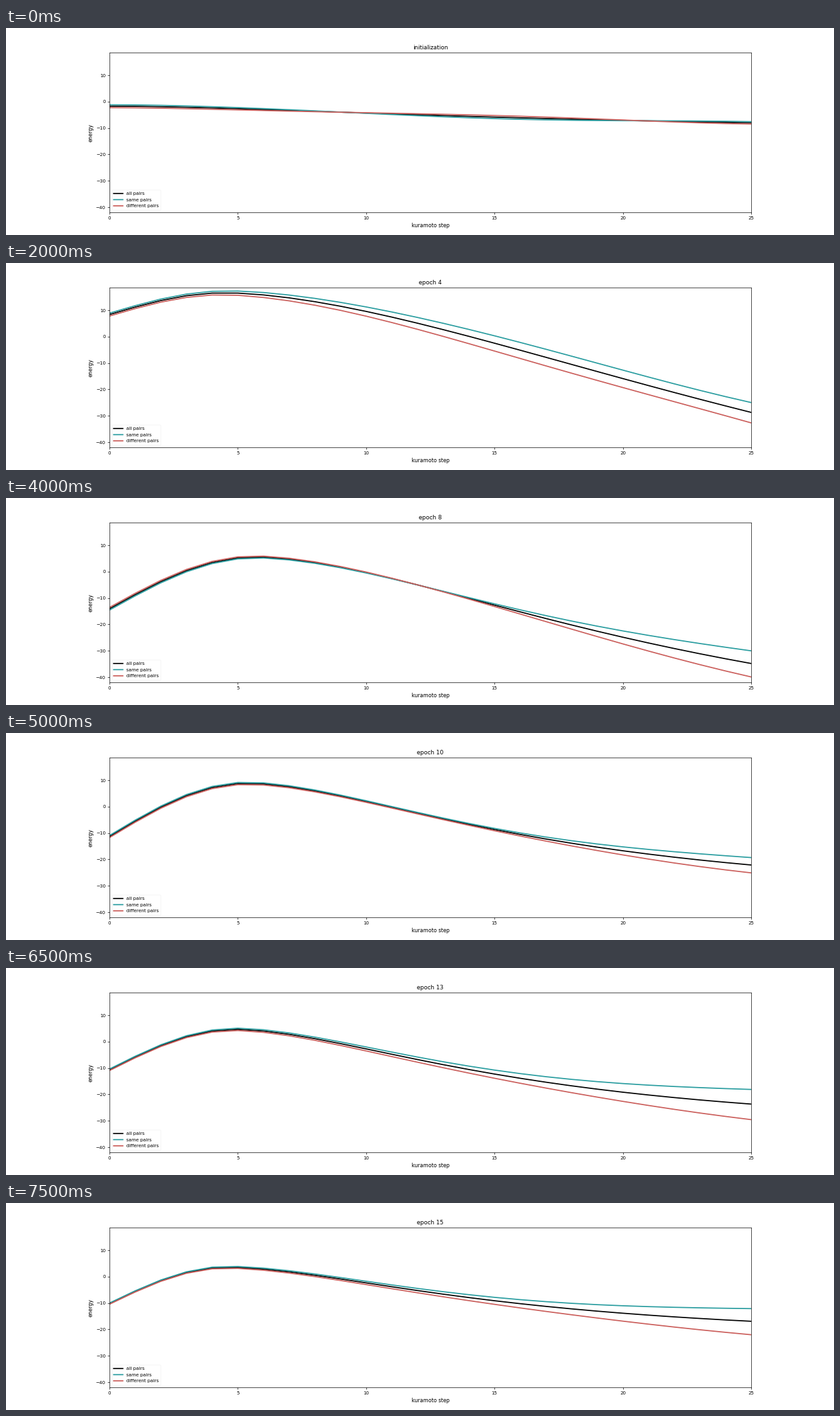
A matplotlib script for the animation above (8 s loop, 1280x320 px).

```python
import numpy as np
import matplotlib.pyplot as plt
from matplotlib.animation import FuncAnimation

EPOCHS = 16
INTERVAL = 500
STEPS = np.arange(26)
BELOW = 0.515  # part of the gap that lies below the overall mean

# Key values by epoch, linear in between.
START = {0: -1.7, 4: 8.4, 6: -11.3, 8: -14.05, 10: -11.3, 15: -10.2}
PEAK = {0: -1.7, 4: 16.65, 6: 10.35, 8: 5.6, 10: 8.9, 13: 4.7, 15: 3.6}
PEAK_STEP = {0: 0.1, 4: 4.5, 6: 6.9, 8: 5.7, 15: 4.6}
END = {0: -8.0, 3: -1.3, 4: -28.7, 5: -26.1, 6: -17.9, 7: -20.0,
       8: -34.8, 9: -32.5, 10: -22.1, 13: -23.65, 15: -16.9}
BEND = {0: 0.6, 4: 1.84, 6: 2.6, 8: 0.97, 10: 0.48, 15: 0.4}
GAP_START = {0: 1.1, 4: 1.1, 6: -0.5, 8: -1.0, 10: 0.8, 15: 0.45}
GAP_END = {0: 0.9, 4: 7.7, 6: 8.7, 8: 9.9, 10: 5.8, 13: 11.45, 15: 9.9}
GAP_BULGE = {0: -2.2, 4: 2.3, 8: -1.9, 15: -1.2}


def at(track, epoch):
    return np.interp(epoch, list(track), list(track.values()))


def mean_energy(epoch):
    """Sine rise to the peak, then a fall that levels off as bend shrinks."""
    start, peak, end = (at(t, epoch) for t in (START, PEAK, END))
    top, bend = at(PEAK_STEP, epoch), at(BEND, epoch)
    rise = np.sin(np.pi / 2 * np.clip(STEPS / top, 0, 1))
    fall = np.clip((STEPS - top) / (25 - top), 0, 1) ** 1.7
    fall = fall * (1 + bend) / (fall + bend)
    return start + (peak - start) * rise - (peak - end) * fall


def pair_gap(epoch):
    """Same-pair minus different-pair energy."""
    first, last = at(GAP_START, epoch), at(GAP_END, epoch)
    x = STEPS / 25
    bulge = np.sin(np.pi * x**1.4) ** 2
    return first + (last - first) * x**2 + at(GAP_BULGE, epoch) * bulge


def energies(epoch):
    mean, gap = mean_energy(epoch), pair_gap(epoch)
    return mean, mean + (1 - BELOW) * gap, mean - BELOW * gap


plt.rcParams["font.family"] = "DejaVu Sans"
fig, ax = plt.subplots(figsize=(20, 5), dpi=64)
fig.subplots_adjust(left=0.125, right=0.9, bottom=0.11, top=0.88)

lines = [ax.plot(STEPS, np.zeros(26), color=color, lw=2, label=label)[0]
         for label, color in (("all pairs", "black"),
                              ("same pairs", "#2a9da0"),
                              ("different pairs", "#cb5f5c"))]

ax.set_xlim(0, 25)
ax.set_ylim(-41.9, 18.52)
ax.set_xticks(range(0, 26, 5))
ax.set_yticks(range(-40, 11, 10))
ax.tick_params(labelsize=8)
ax.set_xlabel("kuramoto step", fontsize=9)
ax.set_ylabel("energy", fontsize=9)
title = ax.set_title("initialization", fontsize=10)
legend = ax.legend(loc="lower left", fontsize=8, edgecolor="0.95")
for handle in legend.get_lines():
    handle.set_snap(False)


def update(epoch):
    for line, y in zip(lines, energies(epoch)):
        line.set_ydata(y)
    title.set_text(f"epoch {epoch}" if epoch else "initialization")
    return [*lines, title]


anim = FuncAnimation(fig, update, frames=EPOCHS, interval=INTERVAL,
                     repeat=True, repeat_delay=0, blit=False)
plt.show()
```
